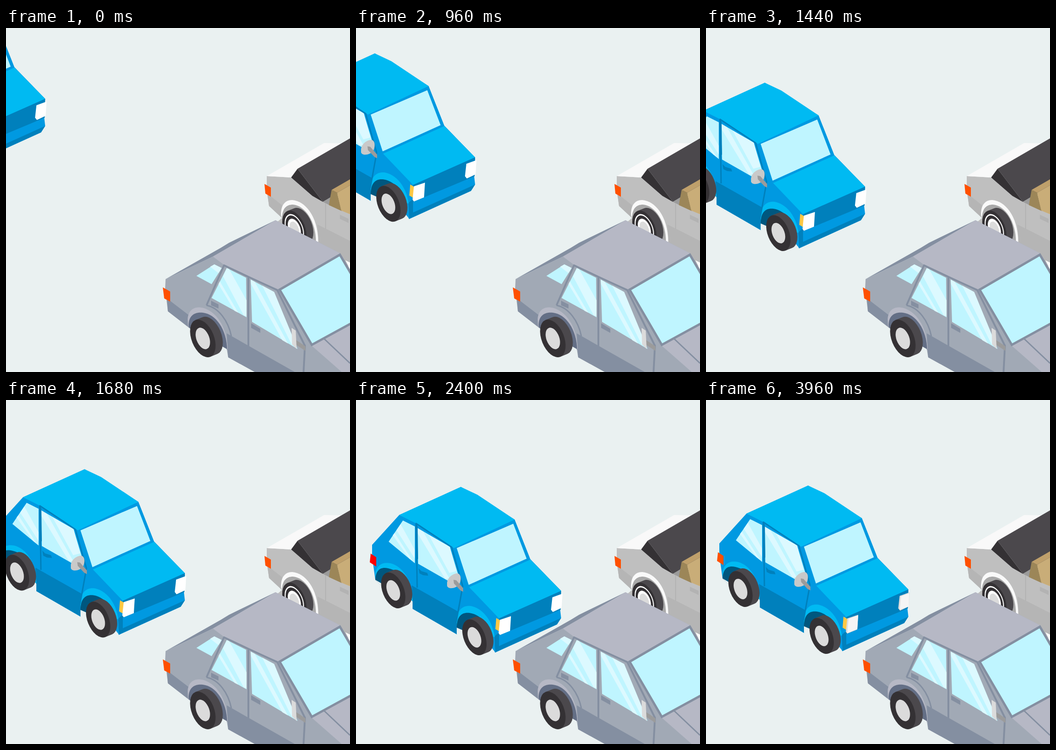
An HTML page that plays this animation: 748x748 px, repeating every 4.09 s.

```html
<!DOCTYPE html>
<html lang="en">
<head>
<meta charset="utf-8">
<title>Parking</title>
<style>
html, body { margin: 0; width: 100%; height: 100%; overflow: hidden; background: #eaf1f1; }
svg { display: block; width: 100%; height: 100%; }
.ground { fill: #eaf1f1; }
.glass { fill: #bff5ff; }
.shine { fill: #dcf9ff; }
.brake { fill: #ff5000; }
.line { fill: none; stroke-width: 4; stroke-linejoin: round; }
</style>
</head>
<body>
<svg viewBox="0 0 748 748">
<defs>
  <g id="tyre">
    <path fill="#4b484c" d="M-15.4-38l15-6A23.2 41 -22 0 1 30.4 32L15.4 38Z"/>
    <ellipse fill="#343134" rx="23.2" ry="41" transform="rotate(-22)"/>
  </g>
  <g id="wheel">
    <use href="#tyre"/>
    <ellipse fill="#dbdbdb" rx="13.3" ry="23.3" transform="rotate(-21)"/>
  </g>
</defs>

<!-- white convertible -->
<g>
  <path fill="#bfbfbf" d="M567 322 620 325 666 365 690 378 748 405V520L586 425 600 413 572 387 567 350Z"/>
  <path fill="#b5b5b5" d="M568 360 600 385V413L572 387ZM677 427 748 463V515L680 470Z"/>
  <path fill="#f9f9f9" d="M567 322 692 250 730 251 634 307 620 325ZM738 505 748 510V524Z"/>
  <path fill="#4b484c" d="M634 306 748 240V345L689 378Z"/>
  <path fill="#343134" d="M634 306 620 325 666 365 689 378Z"/>
  <path fill="#9b9b9b" d="M689 378 707 367 703 385Z"/>
  <path fill="#9c8658" d="M708 352 720 358 730 398 702 385Z"/>
  <path fill="#c9ad78" d="M720 358 748 342V405L729 397Z"/>
  <path fill="#bfa06b" d="M708 352 748 329V342L720 358Z"/>
  <path class="line" style="stroke:#b3b3b3;stroke-width:2" d="M695 381V437"/>
  <path fill="#b3b3b3" d="M726 406 745 415V424L726 415Z"/>
  <path fill="#f9f9f9" d="M598 408C597 385 607 374 622 374C650 376 678 408 679 465L674 466 600 413Z"/>
  <path fill="#a9a9a9" d="M600 412C601 392 610 384 624 384C650 386 674 420 674 466L640 460Z"/>
  <use href="#tyre" transform="translate(627 436)"/>
  <g transform="translate(627 436) rotate(-22)">
    <ellipse fill="#fff" rx="18.5" ry="33"/>
    <ellipse fill="#343134" rx="16.5" ry="30"/>
    <ellipse fill="#fff" rx="12.5" ry="22.5"/>
    <ellipse fill="#dbdbdb" rx="9" ry="16"/>
  </g>
  <path class="brake" d="M562 339 576 347V367L564 360Z"/>
</g>

<!-- grey saloon -->
<g>
  <path fill="#a1a9b5" d="M347 546 450 497 586 418 727 490 748 525V748H541L483 716 398 652 352 616 346 567Z"/>
  <path fill="#848fa1" d="M586 418 485 467 467 478 347 546 450 497Z
    M350 588 397 624 399 652 352 616ZM480 664 628 748H541L483 716Z"/>
  <path fill="#b6b8c5" d="M586 418 727 490 594 569 526 540 474 515 450 497Z
    M665 691 748 644V748H730Z
    M395 634C396 611 412 604 430 609C455 617 480 645 482 698L470 700 396 650Z"/>
  <path fill="#646f86" d="M397 650C396 627 408 617 428 619C456 622 480 655 481 700L430 690Z"/>
  <path class="ground" d="M398 652 480 698 483 716 440 722 400 690Z"/>
  <path class="glass" d="M414 539 453 514 469 522 447 557ZM480 522 522 543 523 629 447 587Z
    M532 547 583 574 634 698 535 639Z"/>
  <path class="shine" d="M444 519 453 514 469 522 462 533Z
    M472 540 480 522 485 524 523 592V627L517 625Z M462 557 465 551 505 619 497 615Z
    M557 560 583 574 627 680 622 690Z M532 547 541 552 613 686 601 679 533 557Z"/>
  <g class="line" stroke="#848fa1">
    <path d="M436 603 474 516 527 541 590 570 650 691 647 748M527 541V692"/>
    <path style="stroke-width:3" d="M436 603C462 608 483 636 490 670M692 676 748 729"/>
  </g>
  <path fill="#bff5ff" stroke="#848fa1" stroke-width="5" d="M595 569 726 493 760 551V637L665 689Z"/>
  <path fill="#848fa1" d="M446 593 462 601V610L446 603ZM533 642 553 654V663L533 652Z"/>
  <path fill="#9b9b9b" d="M630 678 651 692V702L631 689Z"/>
  <path fill="#dbdbdb" d="M621 652 630 658 632 698 622 688Z"/>
  <use href="#wheel" transform="translate(428 675) scale(1.05)"/>
  <path class="brake" d="M341 564 357 573V595L344 588Z"/>
</g>

<!-- blue hatchback -->
<g id="car">
  <path fill="#0099e1" d="M94 250 35 315V340L42 391 123 437V454L218 509 303 549 437 488 446 474 444 457 446 415 379 346 345 260 228 189Z"/>
  <path fill="#00baf2" d="M228 189 264 206 345 260 213 322 130 268 94 250ZM379 347 446 415 311 475 246 407Z"/>
  <path fill="#0080bc" d="M121 403 222 460 219 509 123 454Z
    M311 475 446 415 445 456 311 512Z
    M302 549 437 488 446 474 311 535 311 505 300 515Z"/>
  <path fill="#00baf2" d="M42 376C46 358 58 352 75 355C102 362 122 392 123 437L42 390Z
    M219 480C220 455 233 446 250 448C280 454 302 488 303 530L298 530 219 495Z"/>
  <path fill="#00577f" d="M42 391C43 370 53 362 70 366C100 372 118 400 120 437L80 430Z
    M219 496C219 470 230 461 247 463C275 467 296 498 298 530L260 530Z"/>
  <path class="ground" d="M42 391 123 438V454L100 452ZM219 495 240 504 298 530 302 549 250 560 219 509Z"/>
  <path fill="#0099e1" d="M294 515 304 515 303 549 296 540Z"/>
  <path fill="#0080bc" d="M301 516 311 508V535L303 549Z"/>
  <path class="glass" d="M102 262 128 275V355L71 308ZM133 278 204 319 226 392 205 396 135 356Z
    M219 322 342 269 371 345 245 402Z"/>
  <path class="shine" d="M88 283 97 270 128 326V345ZM80 294 84 289 124 351 116 345Z
    M158 293 204 319 218 372 203 376ZM133 278 146 286 203 388 194 389 134 290Z"/>
  <g class="line" stroke="#0080bc" style="stroke-width:3">
    <path d="M130 268 208 320 232 405 218 482M131 268 133 408"/>
  </g>
  <path fill="#0080bc" d="M129 267 134 274 135 345 130 352ZM136 366 142 372 155 376 157 382 146 381 138 377Z"/>
  <path fill="#c9c9c9" d="M198 397C200 384 212 377 221 377C229 379 229 391 225 400C217 411 200 412 198 404Z"/>
  <path fill="#9b9b9b" d="M212 391 218 392 233 409V417L227 414 213 399Z"/>
  <use href="#wheel" x="81" y="414"/>
  <use href="#wheel" x="257.5" y="516"/>
  <path id="tail" d="M32 334 44 342V362L30 353Z"/>
  <path fill="#ffc844" d="M305 474 315 480 313 504 303 498Z"/>
  <path id="lamps" d="M313 478 337 470 335 502 313 511 310 507ZM427 429 449 421 447 452 428 461 424 456Z"/>
  <path id="dim" fill="#f5f5f5" d="M316 479 337 471 335 501 313 510ZM430 430 448 423 447 452 427 459Z"/>
</g>
</svg>
<script>
const $ = id => document.getElementById(id);
const LOOP = 4090, STEP = 60;
const BRAKE = 1620, STOP = 2160;
const clamp = u => Math.max(0, Math.min(1, u));
const smooth = u => u * u * (3 - 2 * u);

// offset on one axis: steady drive, braking, recoil, then a short roll back
function offset(t, start, speed, peak, back) {
  if (t < BRAKE) return start + speed * t;
  if (t < STOP) {
    const span = STOP - BRAKE, u = (t - BRAKE) / span;
    const from = start + speed * BRAKE, dist = peak - from;
    return from + speed * span * u * (1 - u) ** 2
      + dist * (smooth(u) + 0.66 * u * u * (u - 1));
  }
  return peak * (1 - smooth(clamp((t - STOP) / 240)))
    + back * smooth(clamp((t - 2940) / 240));
}

function draw(now) {
  const t = Math.floor(now % LOOP / STEP) * STEP;
  const off = t >= 3960;
  const x = offset(t, -360.8, 0.181, 3, -6);
  const y = offset(t, -261, 0.1326, 2.5, -3);
  $('car').setAttribute('transform', `translate(${x} ${y})`);
  $('tail').setAttribute('fill', off ? '#ff5000' : '#ff0000');
  $('lamps').setAttribute('fill', off ? '#dcdcdc' : '#fff');
  $('dim').setAttribute('visibility', off ? 'visible' : 'hidden');
}

let begin;
function tick(now) {
  begin ??= now;
  draw(now - begin);
  requestAnimationFrame(tick);
}
draw(0);
requestAnimationFrame(tick);
</script>
</body>
</html>
```
